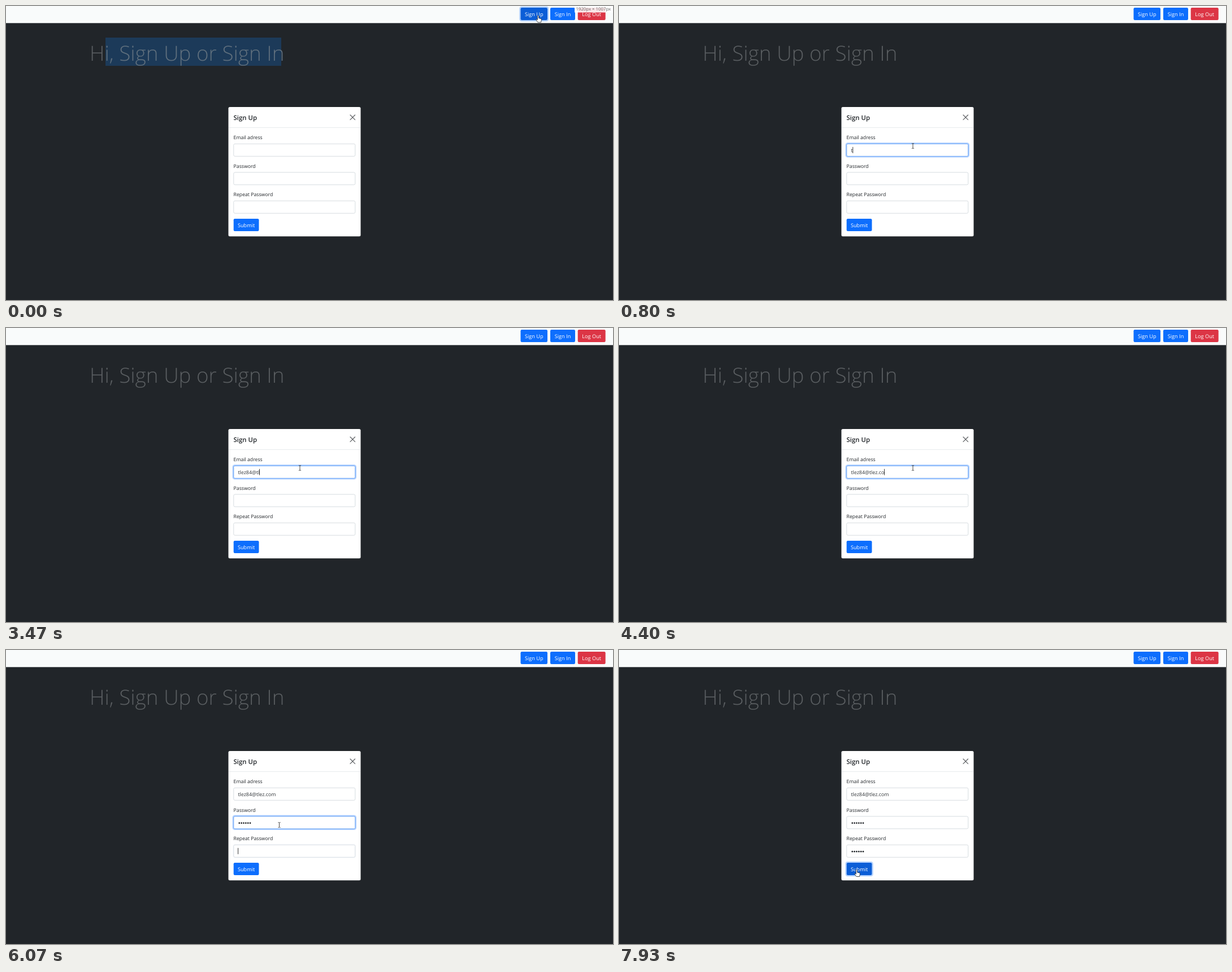
Write an HTML page that moves like this. It is 1074 by 521 pixels and loops after 8000 ms.

```html
<!DOCTYPE html>
<html lang="en">
<head>
<meta charset="utf-8">
<title>Sign up form</title>
<style>
html, body { margin: 0; width: 100%; height: 100%; overflow: hidden; background: #212529; }
svg { display: block; }
text { font: 8.7px "Open Sans", "Noto Sans", sans-serif; fill: #212529; white-space: pre; text-rendering: geometricPrecision; }
.hero { font-size: 36.8px; font-weight: 300; fill: #5a5e61; }
.title { font-size: 11.4px; font-weight: 600; }
.value { font-size: 8.9px; fill: #33373b; }
.btn { font-size: 9.2px; fill: #fff; text-anchor: middle; }
.tip { font-size: 7.8px; fill: #666; }
.ring { fill: none; stroke: #0d6efd; stroke-opacity: .3; stroke-width: 2.4; }
</style>
</head>
<body>
<svg id="stage" width="1074" height="521" viewBox="0 0 1074 521"></svg>
<script>
const LOOP = 8000;
const stage = document.getElementById('stage');
const $ = id => document.getElementById(id);

const buttons = [
  { id: 'up', label: 'Sign Up', x: 910.5, y: 3, w: 47.5, h: 22, color: '#0d6efd' },
  { id: 'in', label: 'Sign In', x: 963, y: 3, w: 44, h: 22, color: '#0d6efd' },
  { id: 'out', label: 'Log Out', x: 1011.7, y: 3, w: 49, h: 22, color: '#dc3545' },
  { id: 'submit', label: 'Submit', x: 402.7, y: 377, w: 44.8, h: 22, color: '#0d6efd' }
];
const fields = [
  { id: 'email', label: 'Email adress', y: 244.3 },
  { id: 'pass', label: 'Password', y: 294.8 },
  { id: 'again', label: 'Repeat Password', y: 345.3 }
].map(f => ({ ...f, x: 402.8, w: 215, h: 22 }));
const controls = [...buttons, ...fields];

// Focus spans, fade length of the ring
const focus = { up: [-500, 600], email: [600, 4800], pass: [4800, 6068], again: [6068, 7800], submit: [7800, 9000] };
const FADE = 130;

const mail = 'tlez84@tlez.com';
const mailKeys = [
  [730, 1], [1000, 2], [1130, 3], [1600, 4], [1870, 5], [2070, 6],
  [2330, 6, 'ç'], [2400, 6, 'ç '], [2600, 6, 'ç'], [2730, 6],
  [3070, 7], [3270, 8], [3470, 9], [3670, 10], [3870, 11], [4070, 12],
  [4200, 13], [4330, 14], [4470, 15]
];
const dotKeys = {
  pass: [5070, 5200, 5400, 5530, 5670, 5870],
  again: [6270, 6400, 6530, 6670, 6800, 6930]
};
const path = [
  [0, 941.5, 17], [70, 941.5, 17], [550, 520, 248], [4530, 520, 248], [4780, 483.5, 310],
  [7070, 483.5, 310], [7330, 476.5, 316], [7790, 420.5, 389.5], [LOOP, 420.5, 389.5]
];

const rect = (x, y, w, h, rest) => `<rect x="${x}" y="${y}" width="${w}" height="${h}" ${rest}/>`;
const text = (x, y, cls, str, id = '') => `<text x="${x}" y="${y}" class="${cls}" id="${id}">${str}</text>`;
const ring = c => rect(c.x - 1.1, c.y - 1.1, c.w + 2.2, c.h + 2.2, `rx="3" class="ring" id="${c.id}Ring"`);

const drawButton = b => ring(b) +
  rect(b.x, b.y, b.w, b.h, `rx="2.2" fill="${b.color}" id="${b.id}"`) +
  text(b.x + b.w / 2, b.y + 14.6, 'btn', b.label);

const drawField = f => {
  const box = (rest) => rect(f.x, f.y, f.w, f.h, `rx="2.2" fill="none" ${rest}`);
  const dots = (dotKeys[f.id] || []).map((_, i) =>
    `<circle cx="${412.8 + 3.85 * i}" cy="${f.y + 11.9}" r="1.35" fill="#212529"/>`).join('');
  return text(402.6, f.y - 8.2, '', f.label) + box('stroke="#d3d8dd" stroke-width=".9"') +
    `<g id="${f.id}Focus">${box('stroke="#86b7fe"')}${ring(f)}</g>` +
    `<g id="${f.id}Dots">${dots}</g>`;
};

stage.innerHTML =
  rect(0, 0, 1074, 521, 'fill="#212529"') +
  rect(0, 0, 1074, 30.3, 'fill="#f9fbfb"') +
  rect(176, 56, 311, 50, 'fill="#1c3a59" id="selection"') +
  text(148, 97.3, 'hero', 'H<tspan id="selected">i, Sign Up or Sign In</tspan>') +
  rect(393.5, 179, 234, 229.3, 'rx="2.5" fill="#fff"') +
  rect(394, 215, 233, .7, 'fill="#dee2e6"') +
  text(402.6, 202, 'title', 'Sign Up') +
  '<path d="M609 193l8.6 8.6m0-8.6l-8.6 8.6" stroke="#55585b" stroke-width="1.1" stroke-linecap="round"/>' +
  fields.map(drawField).join('') + buttons.map(drawButton).join('') +
  text(410.4, 258.9, 'value', '', 'mail') +
  rect(0, 0, .9, 11, 'fill="#222" id="caret"') +
  '<g id="tip">' + rect(1006, 0, 68, 11.5, 'fill="#fff" fill-opacity=".87"') +
  text(1008.5, 8.3, 'tip', '1920px × 1007px') + '</g>' +
  `<g id="cursor" stroke-linejoin="round">
    <path id="hand" fill="#fff" stroke="#222" stroke-width=".8" d="M-1.1 1a1.1 1.1 0 0 1 2.2 0V4.6L4.4 5.3Q6 5.7 6 7.2L5 12H-.4L-3.5 7.8Q-3.6 6.3-2.2 6.7L-1.1 7.7Z"/>
    <path id="beam" fill="none" stroke="#333" stroke-width=".9" d="M-2-4.5Q0-4.5 0-3.6Q0-4.5 2-4.5M0-3.6V3.6M-2 4.5Q0 4.5 0 3.6Q0 4.5 2 4.5"/>
    <path id="arrow" fill="#fff" stroke="#222" stroke-width=".6" d="M0 0V10L2.4 7.8 4 11.4 5.6 10.7 4 7.2H7.2Z"/>
  </g>`;

const clamp = v => Math.max(0, Math.min(1, v));
const show = (id, on) => $(id).setAttribute('visibility', on ? 'visible' : 'hidden');
const inside = (c, x, y) => x >= c.x && x <= c.x + c.w && y >= c.y && y <= c.y + c.h;

function pointer(t) {
  const i = path.findIndex((p, k) => k && t <= p[0]);
  const [a, b] = [path[i - 1], path[i]];
  const u = clamp((t - a[0]) / (b[0] - a[0])), e = u * u * (3 - 2 * u);
  return [a[1] + (b[1] - a[1]) * e, a[2] + (b[2] - a[2]) * e];
}

function drawCursor(t) {
  const [x, y] = pointer(t);
  const over = controls.find(c => inside(c, x, y));
  const hand = buttons.includes(over);
  const beam = fields.includes(over) ||
    fields.some(f => inside({ x: 403, y: f.y - 17, w: 70, h: 12 }, x, y));
  show('hand', hand);
  show('beam', !hand && beam);
  show('arrow', !hand && !beam);
  $('cursor').setAttribute('transform', `translate(${x} ${y})`);
  for (const b of buttons) $(b.id).setAttribute('fill', b === over ? '#0b5ed7' : b.color);
}

function drawFocus(t) {
  for (const [id, [on, off]] of Object.entries(focus)) {
    const k = clamp((t - on) / FADE) * (1 - clamp((t - off) / FADE));
    $($(id + 'Focus') ? id + 'Focus' : id + 'Ring').setAttribute('opacity', k);
  }
  for (const id of ['in', 'out']) show(id + 'Ring', false);
}

function drawInput(t) {
  const typed = mailKeys.filter(k => k[0] <= t).pop();
  $('mail').textContent = typed ? mail.slice(0, typed[1]) + (typed[2] || '') : '';
  for (const id in dotKeys) {
    [...$(id + 'Dots').children].forEach((dot, i) =>
      dot.setAttribute('visibility', t >= dotKeys[id][i] ? 'visible' : 'hidden'));
  }

  const field = fields.find(f => t >= focus[f.id][0] && t < focus[f.id][1]);
  show('caret', false);
  if (!field) return;
  const times = dotKeys[field.id] || mailKeys.map(k => k[0]);
  const past = times.filter(k => k <= t);
  const width = field.id === 'email' ? $('mail').getComputedTextLength() : past.length * 3.85;
  const since = t - (past.length ? past[past.length - 1] : focus[field.id][0]);
  show('caret', since % 1060 < 530);
  $('caret').setAttribute('x', 410.2 + width);
  $('caret').setAttribute('y', field.y + 5.5);
}

function frame(now) {
  const t = now % LOOP;
  show('tip', t < 400);
  show('selection', t < 600);
  $('selected').style.fill = t < 600 ? '#5f6f7d' : '';
  drawCursor(t);
  drawFocus(t);
  drawInput(t);
}

const start = performance.now();
function tick() {
  frame(performance.now() - start);
  requestAnimationFrame(tick);
}
tick();
</script>
</body>
</html>
```
